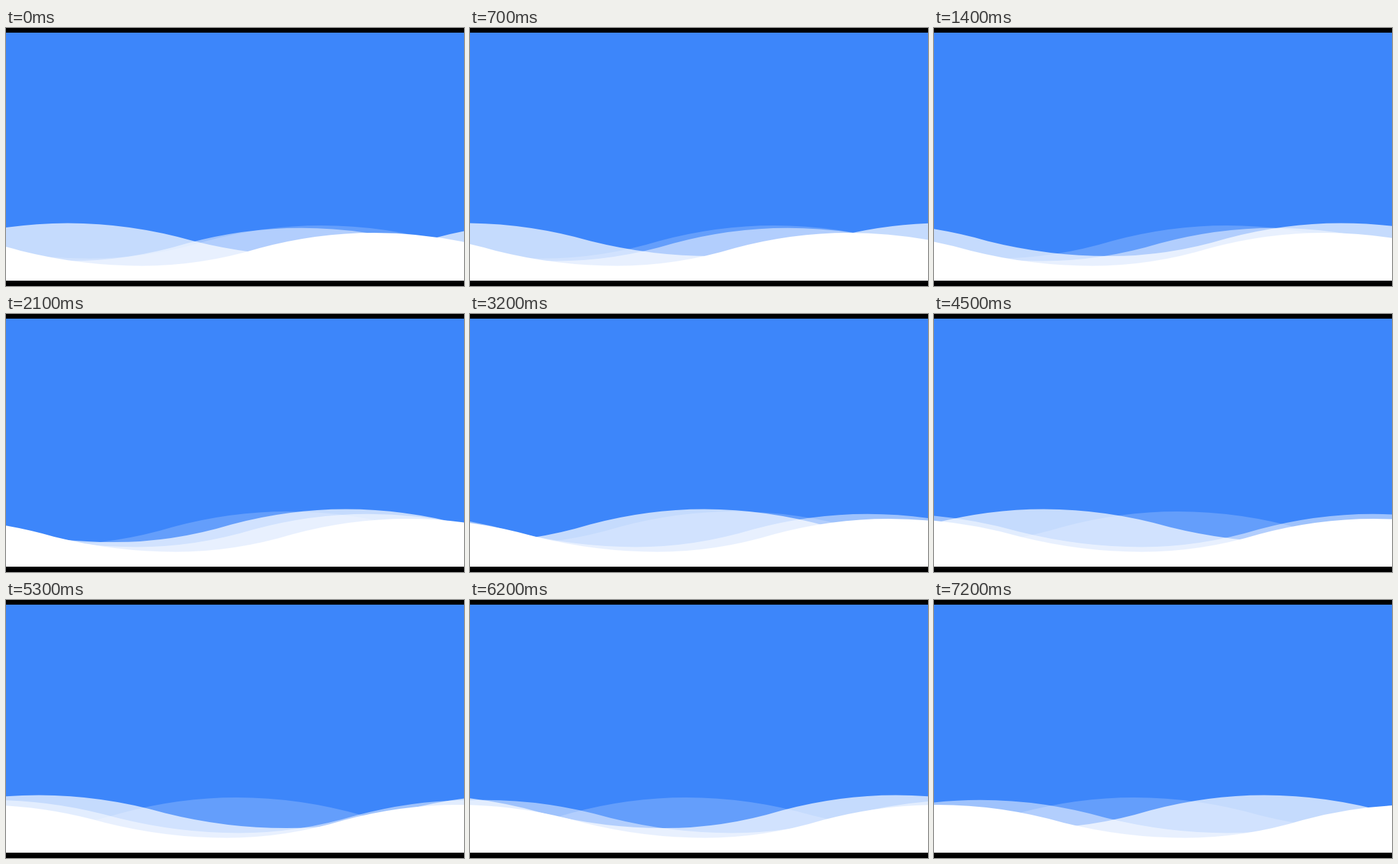
These frames come from a looping animation (690 by 388 pixels, 7300 ms). An HTML page with a canvas:

```html
<!DOCTYPE html>
<html lang="en">
<head>
<meta charset="utf-8">
<title>Waves</title>
<style>
  html, body { margin: 0; width: 100%; height: 100%; overflow: hidden; background: #000; }
  canvas { display: block; }
</style>
</head>
<body>
<canvas id="stage" width="690" height="388"></canvas>
<script>
const ctx = document.getElementById('stage').getContext('2d');
const LOOP = 7300, STEP = 100, WIDTH = 690, TOP = 7, BOTTOM = 380;
const PERIOD = 722, DEPTH = 49.7;
// Steps on which the picture stays as it was
const HOLDS = [10, 23, 35, 46, 57, 61, 69];

// crest: height of the peak, x: its place at time 0, turn: seconds per period (negative = leftward)
const waves = [
  { crest: 293.4, x: 93, turn: -5, alpha: 0.7 },
  { crest: 297.1, x: 475, turn: -30, alpha: 0.2 },
  { crest: 300.8, x: 445, turn: 15, alpha: 0.5 },
  { crest: 308, x: 554, turn: 30, alpha: 1 }
];

function drawWave({ crest, x, turn, alpha }, seconds) {
  const peak = (x + PERIOD * seconds / turn) % PERIOD;
  const low = crest + DEPTH;
  ctx.globalAlpha = alpha;
  ctx.beginPath();
  for (let i = -2; i <= 2; i++) {
    const p = peak + i * PERIOD;
    if (i === -2) ctx.moveTo(p - 172, crest + 23);
    ctx.quadraticCurveTo(p - 86, crest, p, crest);
    ctx.quadraticCurveTo(p + 95, crest, p + 190, crest + 27);
    ctx.quadraticCurveTo(p + 281.5, low, p + 373, low);
    ctx.quadraticCurveTo(p + 461.5, low, p + 550, crest + 23);
  }
  ctx.lineTo(peak + 3 * PERIOD, BOTTOM);
  ctx.lineTo(peak - 3 * PERIOD, BOTTOM);
  ctx.fill();
}

function draw(ms) {
  let step = Math.floor(ms % LOOP / STEP);
  if (HOLDS.includes(step)) step--;
  ctx.globalAlpha = 1;
  ctx.fillStyle = '#000';
  ctx.fillRect(0, 0, WIDTH, 388);
  ctx.fillStyle = '#3d86fa';
  ctx.fillRect(0, TOP, WIDTH, BOTTOM - TOP);
  ctx.fillStyle = '#fff';
  waves.forEach(wave => drawWave(wave, step * STEP / 1000));
}

const start = performance.now();
function tick() {
  draw(performance.now() - start);
  requestAnimationFrame(tick);
}
tick();
</script>
</body>
</html>
```
